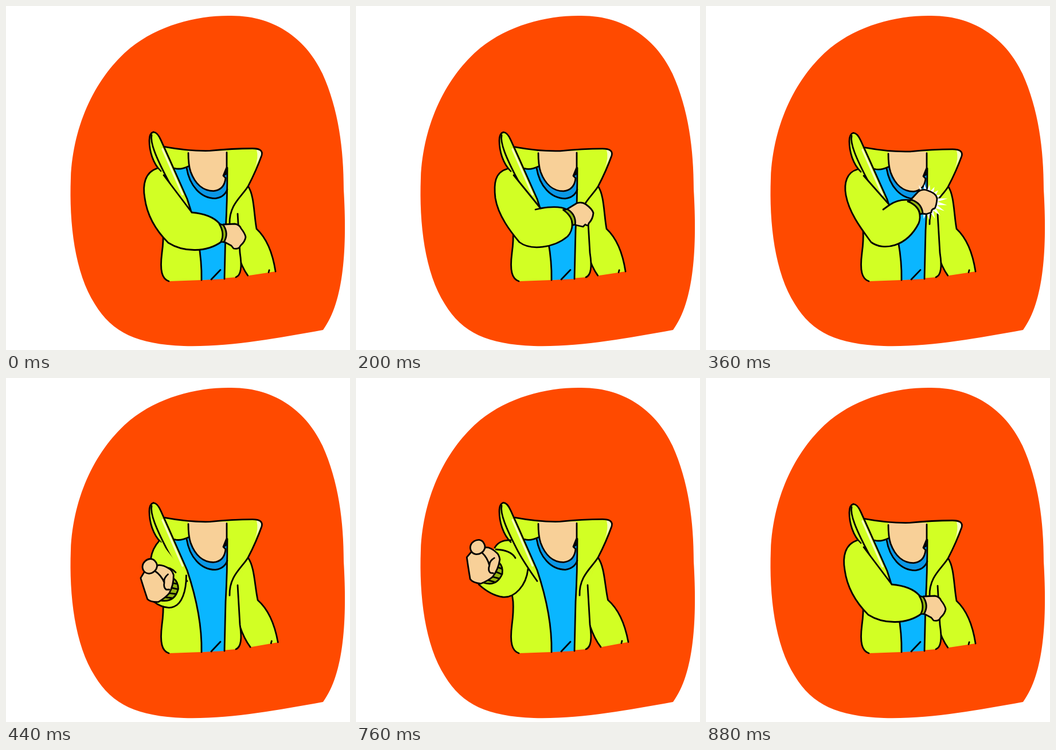
Recreate the animation shown at these times as an HTML page with a canvas. Size 600 by 600 pixels, loop 1 s.

```html
<!DOCTYPE html>
<html lang="en">
<head>
<meta charset="utf-8">
<title>Pointing jacket</title>
<style>
html, body { margin: 0; width: 100%; height: 100%; overflow: hidden; background: #fff; }
canvas { display: block; }
</style>
</head>
<body>
<canvas id="stage" width="600" height="600"></canvas>
<script>
const ctx = document.getElementById('stage').getContext('2d');
const ORANGE = '#ff4a00', LIME = '#d2ff24', PALE = '#f4ffc4', BLUE = '#0ab6ff',
  NAVY = '#0a97e6', SKIN = '#f8d098', OLIVE = '#95b510', INK = '#000';

function shape(d, fill, line, width = 2.8) {
  const path = new Path2D(d);
  if (fill) { ctx.fillStyle = fill; ctx.fill(path); }
  if (line) { ctx.strokeStyle = line; ctx.lineWidth = width; ctx.stroke(path); }
}
const ink = d => shape(d, null, INK);

function within(transform, draw) {
  ctx.save();
  transform();
  draw();
  ctx.restore();
}

// Blend two paths that share the same commands.
function mix(a, b, k) {
  const to = b.match(/-?[\d.]+/g);
  let i = 0;
  return a.replace(/-?[\d.]+/g, n => +n + (to[i++] - n) * k);
}

// Poses 0-2: fist low, middle, on the chest. Poses 3-5: arm swinging out to point.
const poses = [
  { sleeve: 'M264,283 C242,290 238,312 242,335 C247,372 268,398 283,413 C310,430 350,430 376,411 C384,400 380,386 372,379 C362,368 345,362 324,360 L275,295',
    fist: 'M379,381 L399,380 Q407,381 410,388 Q417,397 418,403 Q417,411 409,418 Q406,425 397,423 L393,418 L380,411 Z',
    crease: 'M324,360 L324,360', hand: '379 397 0', drop: 2.8 },
  { sleeve: 'M264,284 C242,290 240,310 243,335 C248,366 270,394 285,412 C305,427 345,422 369,402 C380,390 380,372 368,355 C358,350 345,349 322,353 L275,295',
    fist: 'M367,355 L385,344 Q394,341 401,346 Q412,354 414,361 Q413,372 406,379 Q405,385 400,381 L396,385 L383,382 Z',
    crease: 'M322,353 L313,355', hand: '375 368 -25', drop: 3.2 },
  { sleeve: 'M264,285 C246,290 240,308 244,330 C250,362 272,390 288,412 C310,428 350,420 371,379 C376,366 372,350 358,339 C346,337 332,339 320,347 L275,296',
    fist: 'M357,338 L370,324 Q378,318 387,322 Q402,327 403,336 Q402,348 399,353 Q393,354 393,360 L384,363 L376,362 Z',
    crease: 'M320,347 L309,355', hand: '368 350 -38', drop: 4.3 },
  { top: 'M268,392 Q238,330 266,284', low: 'L324,352 C326,380 326,400 318,410 C308,420 285,415 268,392',
    crease: 'M285,350 Q300,348 308,356', hand: '292 378 -45', drop: 1 },
  { top: 'M242,296 Q250,282 270,283', low: 'L300,333 C297,362 277,384 256,382 C240,380 225,370 214,360',
    crease: 'M244,299 Q270,300 278,314', hand: '220 325 -30', drop: 0.5 },
  { top: 'M238,278 Q250,285 268,281', low: 'L276,340 C262,352 240,364 222,363 C205,363 192,345 186,318',
    crease: 'M258,283 Q267,298 262,311', hand: '207 290 0', drop: 0 }
];

// One pose position per 40 ms.
const track = [0, .4, 1.2, 2, 1.6, 1, 0, .4, 1.2, 2, 1.2, 3.4, 4.6,
  5, 5, 5, 5, 5, 5, 4, 3.3, .5, 0, 0, 0];

function poseAt(p) {
  const a = poses[Math.floor(p)], b = poses[Math.ceil(p)], out = {};
  for (const key in a) out[key] = mix(String(a[key]), String(b[key]), p % 1);
  return out;
}

function farArm(tuck) {
  within(() => {
    ctx.translate(422, 313 + tuck);
    ctx.rotate(tuck * 0.04);
    ctx.translate(-422, -314);
  }, () => {
    shape('M422,314 C434,330 434,362 440,388 C460,405 470,430 476,461 L429,470 Q417,456 409,433 L404,361 Z', LIME);
    ink('M422,314 C434,330 434,362 440,388 C460,405 470,430 476,461');
    ink('M409,433 Q417,456 428,470 M465,459 L464,463');
  });
}

function body() {
  const side = 'M262,350 Q272,368 274,390 Q275,408 272,430 C268,462 272,476 284,480';
  const collar = 'M277,243 Q320,251 356,250 Q395,246 430,246 Q449,246 446,258 Q437,284 422,313';
  shape(side + ' L340,478 L401,473 Q411,468 410,445 L404,361 L422,313 L446,258 Q449,246 430,246 Q395,246 356,250 Q320,251 277,243 L257,217 Q250,219 250,232 C250,250 256,270 270,286 Z', LIME);
  shape('M294,281 Q305,284 319,277 L386,285 Q386,340 383,390 L381,476 L341,478 C343,430 325,360 316,335 Z', BLUE);
  shape('M315,280 C320,312 340,334 365,334 Q381,333 386,318 L386,280 L319,276 Z', NAVY);
  ink('M315,280 C320,312 340,334 365,334 Q381,332 386,318');
  shape('M318,250 L320,280 C326,305 342,321 362,321 Q381,319 383,298 L379,294 L385,280 L385,250 Z', SKIN);
  ink('M318,254 Q318,275 322,287 C330,309 344,321 362,321 Q381,319 383,298 L379,294 L385,279 L385,253');
  shape('M384,281 L379,295 L384,292 Z', INK, INK, 1);
  ink('M294,281 Q305,284 319,277');
  ink('M386,280 Q386,340 383,390 L381,476 M374,460 L358,477');
  shape('M437,248 Q441,262 434,280 L445,258 Q448,248 437,248 Z', PALE);
  ink(collar + ' C411,331 389,345 390,379');
  ink('M404,361 L408,430 Q414,468 401,473');
  ink(side);
}

function lapel() {
  const edge = 'M257,217 Q264,217 270,231 L283,260 L316,335 C331,380 342,430 341,478';
  shape('M257,217 Q264,217 270,231 L283,260 L316,335 L324,358 L316,354 C280,304 250,245 254,222 Z', LIME);
  shape('M273,247 L308,327', null, PALE, 3.4);
  ink(edge);
  ink('M316,354 C304,337 291,319 280,297 C262,262 251,236 254,222');
  ink('M257,217 Q250,219 250,232 C250,250 256,272 270,286');
}

function placeHand(pose, draw) {
  const [x, y, a] = pose.hand.split(' ').map(Number);
  within(() => {
    ctx.translate(x, y);
    ctx.rotate(a * Math.PI / 180);
  }, draw);
}

function spark() {
  let d = '';
  for (let i = 0; i <= 26; i++) {
    const a = (-125 + i * 9) * Math.PI / 180;
    const r = i % 2 ? 27 + i * 5 % 11 : 19;
    d += (i ? 'L' : 'M') + (385 + r * Math.cos(a)) + ',' + (341 + r * Math.sin(a));
  }
  shape(d + 'Z', '#fff');
}

function chestArm(pose) {
  shape(pose.sleeve, LIME, INK);
  ink(pose.crease);
  shape(pose.fist, SKIN, INK);
  placeHand(pose, () => {
    shape('M-7,-17 L0,-15 Q10,0 1,15 L-4,14 Q3,0 -7,-17 Z', OLIVE, INK);
  });
}

function pointArm(pose) {
  shape(pose.top + pose.low, LIME);
  ink(pose.top);
  ink(pose.low.replace('L', 'M'));
  ink(pose.crease);
  placeHand(pose, () => {
    shape('M-15,28 Q2,47 22,32 Q30,22 27,12 L5,28 Z', OLIVE, INK);
    ink('M-5,29 L3,37 M5,28 L13,36 M14,23 L21,32 M21,18 L26,24');
    shape('M-6,-28 L-17,-24 Q-22,-12 -31,12 Q-30,20 -19,28 Q-5,30 5,28 Q20,22 31,8 Q34,0 32,-5 Q28,-18 21,-22 Z', SKIN, INK);
    ink('M10,-18 Q14,-5 10,8 Q3,14 5,20 L9,23 M24,1 Q14,1 10,8');
    shape('M-5,-29 C-5,-46 21,-46 21,-31 C22,-14 -4,-14 -5,-29 Z', SKIN, INK);
  });
}

function draw(now) {
  const p = track[Math.floor(now % 1000 / 40)];
  const pose = poseAt(p);
  const squash = () => {
    ctx.translate(0, 480);
    ctx.scale(1, 1 - pose.drop / 263);
    ctx.translate(0, -480);
  };
  ctx.clearRect(0, 0, 600, 600);
  ctx.lineCap = ctx.lineJoin = 'round';
  shape('M388,17 C470,15 525,60 552,118 C580,180 589,250 589,320 C595,420 590,515 553,565 C470,580 390,595 310,593 C230,590 185,570 155,520 C120,465 110,380 113,300 C117,205 158,122 217,73 C266,34 330,17 388,17 Z', ORANGE);
  farArm(Math.min(pose.drop / 2.8, 1));
  within(squash, body);
  if (p >= 4) pointArm(pose);
  within(squash, lapel);
  if (p === 2) spark();
  if (p <= 2) chestArm(pose);
  else if (p < 4) pointArm(pose);
}

function loop() {
  draw(performance.now());
  requestAnimationFrame(loop);
}
loop();
</script>
</body>
</html>
```
